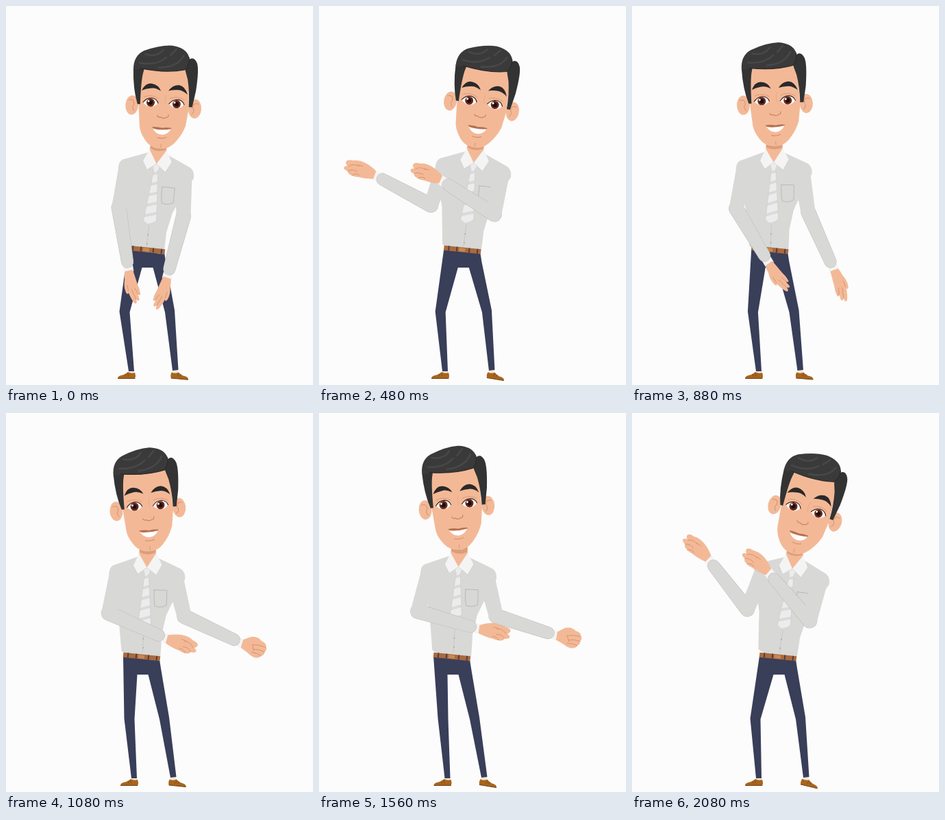
Write an HTML page with a canvas that moves like this. It is 448 px wide and 552 px high and loops after 2.12 s.

```html
<!DOCTYPE html>
<html lang="en">
<head>
<meta charset="utf-8">
<title>Dancing man in shirt and tie</title>
<style>
html, body { margin: 0; width: 100%; height: 100%; overflow: hidden; background: #fcfcfc; }
canvas { display: block; }
</style>
</head>
<body>
<canvas id="stage" width="448" height="552"></canvas>
<script>
const ctx = document.getElementById('stage').getContext('2d');
const LOOP = 2120, STEP = 40, RAD = Math.PI / 180;
const SHIRT = '#d8d8d6', WHITE = '#f4f4f4', SKIN = '#f3b997', LINE = '#d49474';
const PANTS = '#393e59', HAIR = '#333', SHOE = '#a8651d';

// neck x, y, tilt | head x, y, tilt | hips x | left knee, ankle | right knee, ankle | toe tilt
// | left upper arm, forearm | right upper arm, forearm (degrees, 90 = down)
const down    = [221, 215, 5.5, 230, 141, 3.5, 205, 173, 183, 239, 247, 5, 102, 81, 90, 105];
const lowLeft = [228, 214, 6.5, 238, 141.5, 7, 207.5, 176, 184, 249, 254, 3, 106, 158, 96, 180];
const upLeft  = [236, 212, 7.5, 254, 140.5, 16, 213, 180, 185, 246, 254, 14, 113, 232, 103.5, 229.5];
const swing   = [215, 215, 2.5, 218, 140, 2, 205, 174, 183, 244, 249, 4, 105, 165, 93, 180];
const pass    = [208, 215, 0, 210, 140, 0, 204, 173.5, 183, 242, 247, 4, 102, 99.5, 87, 114];
const lowRight = [206, 210, 1.5, 206.5, 134.5, -3.5, 198, 180, 187, 231, 244, 6, 103.5, 24, 76, 25];
const upRight = [198, 209, -0.5, 190, 135, -10, 194, 181, 187, 227, 241, 9, 110, -45, 72, -40];
const outRight = [204, 209, 2, 200.5, 132, -4, 194, 181, 187.5, 227, 241, 9, 107, 16, 75.5, 18];
const lean = down.map((v, i) => v + (lowLeft[i] - v) * (i < 6 ? 0.4 : 0.05));

const keys = [
  [0, down], [280, lowLeft], [400, upLeft], [560, swing], [680, pass], [1080, lowRight],
  [1320, upRight], [1560, outRight], [1760, lean], [1990, lowLeft], [2080, upLeft]
];

// Monotone cubic interpolation between the key poses
function slope(k, i) {
  const [a, b] = [keys[k], keys[k + 1]];
  return a && b ? (b[1][i] - a[1][i]) / (b[0] - a[0]) : null;
}
function tangent(k, i) {
  const a = slope(k - 1, i), b = slope(k, i);
  if (a === null) return b;
  if (b === null) return a;
  return a * b > 0 ? 2 * a * b / (a + b) : 0;
}
function poseAt(t) {
  let k = 0;
  while (k < keys.length - 2 && t >= keys[k + 1][0]) k++;
  const [t0, p] = keys[k], [t1, q] = keys[k + 1], d = t1 - t0;
  const u = Math.min(1, (t - t0) / d), w = 1 - u;
  return p.map((v, i) => v * (1 + 2 * u) * w * w + q[i] * u * u * (3 - 2 * u)
    + d * u * w * (w * tangent(k, i) - u * tangent(k + 1, i)));
}

function fill(d, color) {
  ctx.fillStyle = color;
  ctx.fill(new Path2D(d));
}
function line(d, color, width = 1) {
  ctx.strokeStyle = color;
  ctx.lineWidth = width;
  ctx.stroke(new Path2D(d));
}
function oval(x, y, rx, ry, color) {
  ctx.fillStyle = color;
  ctx.beginPath();
  ctx.ellipse(x, y, rx, ry, 0, 0, 7);
  ctx.fill();
}
function at(x, y, deg, draw, flip = 1) {
  ctx.save();
  ctx.translate(x, y);
  ctx.rotate(deg * RAD);
  ctx.scale(1, flip);
  draw();
  ctx.restore();
}

function shoe(x, side, tilt) {
  ctx.save();
  ctx.translate(x, 531);
  ctx.scale(side, 1);
  ctx.rotate(tilt * RAD);
  fill('M-4 -2H4V5H-4Z', '#f1e6dd');
  fill('M-5 3Q0 5 5 2Q9 6 15 7Q20 8 20 11.5H-5Q-7 8 -5 3Z', SHOE);
  line('M-5 11.5H19.5', '#6d3d10', 1);
  line('M6 4L4 8M9 5L8 8', '#7d4712', 0.8);
  ctx.restore();
}

function legs(hip, lk, la, rk, ra, tilt) {
  shoe(la, -1, 0);
  shoe(ra, 1, tilt);
  fill(`M${hip - 27} 354L${hip + 26} 359L${hip + 28} 372L${rk + 7} 443L${ra + 4.5} 530
    L${ra - 4} 531L${rk - 7} 446L${hip + 9.5} 381H${hip - 6.5}L${lk + 7.5} 446L${la + 4} 532
    L${la - 4} 532L${lk - 7.5} 445Z`, PANTS);
}

function belt(hip) {
  at(hip, 354.5, 6, () => {
    fill('M-27 -3H27V4H-27Z', '#ac693c');
    for (const x of [-21, -9, 9, 21]) fill(`M${x} -3h2v7h-2Z`, '#4b4048');
    fill('M-5 -2H4V3H-5Z', '#c58a55');
  });
}

function torso(x, y, tilt) {
  const tie = 'M203 230H214L211 239L216 312L206 321L197 314L205 239Z';
  at(x, y, tilt, () => {
    ctx.translate(-208, -215);
    fill('M196 214L159 228Q153 231 153 241L161 270L168 298L174 352Q176 357 204 359L231 360Q232 342 232 328L238 299L251 270L264 246Q265 236 258 231L222 215Z', SHIRT);
    fill('M197 190H220L221 212L208 231L196 212Z', SKIN);
    fill('M197 201Q210 210 220 200V208Q208 214 197 208Z', '#dc9d7c');
    line('M206 320L205 354', '#c5c5c3', 0.8);
    for (const by of [334, 347]) oval(205.5, by, 1, 1, '#aaa');
    fill(tie, '#ececec');
    ctx.save();
    ctx.clip(new Path2D(tie));
    for (let s = 244; s < 325; s += 15) line(`M194 ${s + 4}L220 ${s - 4}`, '#dadada', 4);
    ctx.restore();
    line('M205 239L197 314L206 321L216 312L211 239', '#cbcbcb', 0.6);
    fill('M196 210L208 230L195 240L188 228Z', WHITE);
    fill('M221 209L208 230L222 241L230 226Z', WHITE);
    line('M188 228L195 240L208 230L222 241L230 226', '#c8c8c8', 0.6);
    line('M219.5 262.5H238V284Q230 289 221 286Q219 276 219.5 262.5Z', '#b2b2b2', 0.8);
  });
}

function capsule(path, x1, y1, r1, x2, y2, r2) {
  const a = Math.atan2(y2 - y1, x2 - x1), h = Math.PI / 2;
  path.moveTo(x1 + r1 * Math.cos(a + h), y1 + r1 * Math.sin(a + h));
  path.arc(x1, y1, r1, a + h, a + 3 * h);
  path.arc(x2, y2, r2, a - h, a + h);
  path.closePath();
}

function curledHand() {
  fill('M-2 -6Q8 -11 18 -12Q28 -13 35 -9Q43 -8 44 -4Q44 -1 40 1Q46 4 43 7Q40 9 37 8Q36 12 30 12Q25 13 20 11Q8 10 -2 6Z', SKIN);
  line('M24 -4Q32 -6 38 1M24 4Q31 2 37 8M19 8Q25 6 29 12M19 -6L26 -5', LINE, 0.9);
}

function fistHand() {
  fill('M-2 -6Q4 -11 9 -14Q18 -17 24 -12Q32 -11 33 -6Q36 -2 33 2Q34 7 30 9Q28 14 20 14Q14 13 9 10L-2 6Z', SKIN);
  line('M13 -3Q22 -6 32 -5M16 3Q24 0 33 2M15 8Q22 6 30 9M13 -3L17 5', LINE, 0.9);
}

function relaxedHand() {
  fill('M-2 -6Q8 -10 18 -8L32 -7Q46 -4 47 -1Q47 2 41 1Q46 4 42 6L34 5Q38 8 35 9Q28 10 20 8L-2 6Z', SKIN);
  fill('M8 -8Q18 -13 28 -11Q33 -9 29 -7L18 -6Z', SKIN);
  line('M26 -2L41 1M25 3L35 6M18 -7L27 -7', LINE, 0.9);
}

function arm(neck, offset, upper, fore, side) {
  const tilt = neck[2] * RAD, [ox, oy] = offset;
  const sx = neck[0] + ox * Math.cos(tilt) - oy * Math.sin(tilt);
  const sy = neck[1] + ox * Math.sin(tilt) + oy * Math.cos(tilt);
  const ex = sx + 58 * Math.cos(upper * RAD), ey = sy + 58 * Math.sin(upper * RAD);
  const c = Math.cos(fore * RAD), s = Math.sin(fore * RAD);
  const curled = Math.abs(fore - 90) > 35;
  const hand = !curled ? relaxedHand : side > 0 && c > 0 ? fistHand : curledHand;

  at(ex, ey, fore, () => fill('M80 -7H95Q97 0 95 7H80Z', WHITE));
  at(ex + 95 * c, ey + 95 * s, fore + (curled ? -8 : side * 4), hand,
    curled ? (c < 0 ? -1 : 1) : side);

  const lower = new Path2D(), sleeve = new Path2D();
  capsule(lower, ex, ey, 10.5, ex + 80 * c, ey + 80 * s, 8.5);
  capsule(sleeve, sx, sy, 12.5, ex, ey, 10.5);
  ctx.strokeStyle = '#bdbdbc';
  ctx.lineWidth = 1.1;
  ctx.stroke(lower);
  ctx.fillStyle = SHIRT;
  ctx.fill(lower);
  ctx.fill(sleeve);
}

function eye(x) {
  fill(`M${x - 11} 1Q${x - 6} -6 ${x + 2} -6Q${x + 9} -5 ${x + 11} 1Q${x + 6} 7 ${x} 7Q${x - 7} 6 ${x - 11} 1Z`, '#fff');
  oval(x, 0.8, 6, 6, '#65291f');
  oval(x, 0.8, 3.2, 3.2, '#1f0d0b');
  oval(x - 3, -1.2, 1.5, 1.5, '#fff');
  line(`M${x - 11} 1Q${x - 6} -6 ${x + 2} -6Q${x + 9} -5 ${x + 11} 1`, '#3c2520', 1.2);
  line(`M${x - 10} -7Q${x} -12 ${x + 11} -6`, LINE, 0.8);
}

function head() {
  for (const side of [-1, 1]) {
    oval(side * 46, 6, 9.5, 14, SKIN);
    line(`M${side * 51} -1Q${side * 43} -4 ${side * 43} 5Q${side * 47} 9 ${side * 42} 14`, LINE, 1);
  }
  fill('M-36 -54H34L37 8L34 32Q30 44 23 53Q15 64 7 66Q-2 68 -10 66Q-19 63 -25 54Q-32 44 -33 36L-36 8Z', SKIN);

  // Sides first, then the swept-up front
  fill('M-47 -47L-30 -54L-32 -44Q-35 -32 -34 4H-38Q-46 -18 -47 -47Z', HAIR);
  fill('M28 -54L33 -65Q40 -71 45 -61Q49 -53 46 -20L42 4H37Q37 -18 33 -36L29 -48Z', HAIR);
  fill('M-47 -46Q-48 -66 -33 -74Q-10 -84 8 -84Q28 -82 33 -69Q36 -58 28 -50Q0 -43 -36 -48Q-42 -45 -47 -46Z', '#3a3a3a');
  line('M-38 -56Q-14 -53 0 -66M-31 -69Q-14 -65 -5 -77M-10 -51Q16 -52 25 -70M6 -70L14 -79', '#484848', 2.5);
  line('M-36 -48Q0 -43 28 -50Q35 -58 33 -68', '#2a2a2a', 1.2);

  fill('M-33 -16Q-28 -28 -19 -27Q-9 -26 -5 -17Q-14 -22 -20 -20Q-27 -19 -33 -16Z', '#2a2929');
  fill('M6 -18Q12 -27 21 -27Q30 -26 34 -14Q27 -20 20 -20Q13 -20 6 -18Z', '#2a2929');
  eye(-19);
  eye(19);

  line('M-8 19Q-7 22 -3 21Q1 24 5 21Q9 21 8 17', '#cd8263', 1.2);
  line('M3 -11Q1 -4 3 2', '#e2a988', 0.8);
  fill('M-15 36Q-6 35 0 36.5Q7 35 14 36Q12 41 0 42Q-10 41 -15 36Z', '#b9704f');
  fill('M-13 38.5Q0 40.5 13 37.5Q9 46 0 46.5Q-9 46 -13 38.5Z', '#fff');
  line('M-6 51Q1 53 7 50', '#d08c6b', 1.1);
  line('M0 60Q-1 63 0 65', LINE, 0.9);
}

function draw(t) {
  const p = poseAt(t), neck = p.slice(0, 3);
  ctx.fillStyle = '#fcfcfc';
  ctx.fillRect(0, 0, 448, 552);
  legs(...p.slice(6, 12));
  torso(...neck);
  belt(p[6]);
  at(p[3], p[4], p[5], head);
  arm(neck, [-42, 26], p[12], p[13], -1);
  arm(neck, [41, 29], p[14], p[15], 1);
}

ctx.lineCap = ctx.lineJoin = 'round';
const start = performance.now();
function frame() {
  const t = (performance.now() - start) % LOOP;
  draw(Math.floor(t / STEP) * STEP);
  requestAnimationFrame(frame);
}
frame();
</script>
</body>
</html>
```
